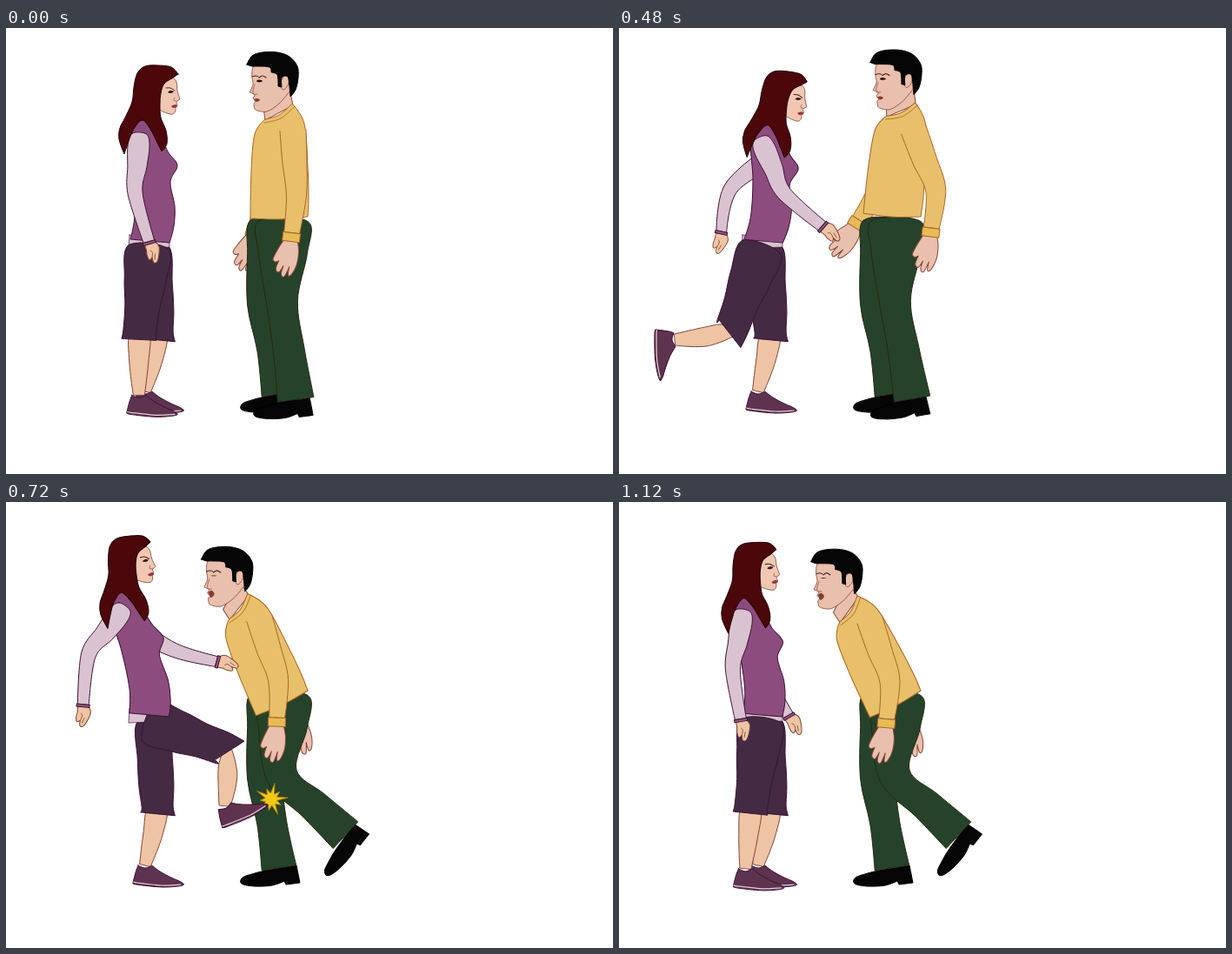
An HTML page that plays this animation: 698 by 513 pixels, repeating every 1.2 s.

```html
<!DOCTYPE html>
<html lang="en">
<head>
<meta charset="utf-8">
<title>Kick</title>
<style>
html, body { margin: 0; width: 100%; height: 100%; overflow: hidden; background: #fff; }
svg { display: block; width: 698px; height: 513px; }
path { stroke-linejoin: round; stroke-linecap: round; }
</style>
</head>
<body>
<svg id="stage" viewBox="0 0 698 513"></svg>
<script>
const stage = document.getElementById("stage");
const LOOP = 1200, STEP = 40;
const TIMES = [120, 240, 480, 640, 720, 960, 1120];
const RAD = Math.PI / 180;
const updates = [];

// Named joint angles (degrees, 0 = right, 90 = down) and offsets, one pose per row.
function poses(names, rows) {
  const keys = names.split(" ");
  return (k, u) => {
    const a = rows[Math.min(k, rows.length - 1)], b = rows[Math.min(k + 1, rows.length - 1)];
    return Object.fromEntries(keys.map((name, i) => [name, a[i] + (b[i] - a[i]) * u]));
  };
}

const womanPose = poses("lean rise upper fore farUpper farFore thigh shin foot", [
  [0, 0, 94, 74, 85, 80, 96, 90, 0],
  [10, 4, 72, 52, 133, 96, 107, 153, 60],
  [15, 6, 66, 41, 141, 102, 110, 174, 83],
  [-11, 0, 104, 81, 57, 56, 52, 130, 8],
  [-26, -3, 127, 96, 29, 15, 20, 95, -28],
  [-18, 2, 109, 86, 54, 48, 86, 97, 0],
  [-14, 4, 100, 81, 72, 60, 97, 95, 0]
]);

const manPose = poses("x y bend upper fore farUpper farFore shin hurt", [
  [0, 0, 0, 87, 97, 100, 106, 82, 0],
  [0, 0, 0.5, 84, 98, 100, 106, 82, 0],
  [0, 0, 5, 70, 97, 108, 122, 80, 0],
  [-4, 6, -7, 73, 96, 90, 88, 67, 0],
  [0, 0, -24, 73, 92, 54, 70, 43, 1],
  [0, 0, -26, 72, 95, 54, 70, 43, 1]
]);

function add(parent, tag, attrs = {}) {
  const el = document.createElementNS("http://www.w3.org/2000/svg", tag);
  for (const name in attrs) el.setAttribute(name, attrs[name]);
  return parent.appendChild(el);
}

// Smooth curve through [x, y, sharp] points.
function curve(pts, closed = true) {
  const n = pts.length;
  const at = i => pts[closed ? (i + n) % n : Math.max(0, Math.min(n - 1, i))];
  const handle = (i, sign) => {
    const [x, y, sharp] = at(i), a = at(i - 1), b = at(i + 1), f = sharp ? 0 : sign / 6;
    return [x + f * (b[0] - a[0]), y + f * (b[1] - a[1])].map(v => v.toFixed(2)).join(" ");
  };
  let d = `M${pts[0][0]} ${pts[0][1]}`;
  for (let i = 0; i < (closed ? n : n - 1); i++) {
    d += `C${handle(i, 1)} ${handle(i + 1, -1)} ${at(i + 1)[0]} ${at(i + 1)[1]}`;
  }
  return closed ? d + "Z" : d;
}

// "x,y" points; "!" marks a sharp turn.
const points = text => text.split(" ").map(p => [...p.match(/-?[\d.]+/g).map(Number), p.endsWith("!")]);

const shape = (parent, fill, stroke, text, width = 1) =>
  add(parent, "path", { d: curve(points(text)), fill, stroke, "stroke-width": width });

const line = (parent, stroke, text, width = 0.8) =>
  add(parent, "path", { d: curve(points(text), false), fill: "none", stroke, "stroke-width": width });

function moving(parent, transform) {
  const g = add(parent, "g");
  updates.push((w, m) => g.setAttribute("transform", transform(w, m)));
  return g;
}

// Chain of bones [angle, length] from a start point.
function chain([x, y], bones) {
  const joints = [{ x, y, a: bones[0][0] }];
  bones.forEach(([angle, length], i) => {
    x += length * Math.cos(angle * RAD);
    y += length * Math.sin(angle * RAD);
    joints.push({ x, y, a: i + 1 < bones.length ? (angle + bones[i + 1][0]) / 2 : angle });
  });
  return { joints, bones };
}

// Outline around a chain; widths are [place, half width], place 1 being the first joint.
function tube({ joints, bones }, widths, closed) {
  const sides = [1, -1].map(side => widths.map(([s, w], i) => {
    const b = Math.max(0, Math.min(bones.length - 1, Math.floor(s)));
    const from = joints[b], [angle, length] = bones[b], d = (s - b) * length;
    const n = (s === b ? from.a : angle) * RAD, a = angle * RAD;
    return [from.x + d * Math.cos(a) - side * w * Math.sin(n),
      from.y + d * Math.sin(a) + side * w * Math.cos(n), i === widths.length - 1];
  }));
  return curve([...sides[0], ...sides[1].reverse()], closed);
}

function limb(parent, fill, stroke, widths, bonesOf, closed = true) {
  const el = add(parent, "path", { fill, stroke });
  updates.push((w, m) => el.setAttribute("d", tube(bonesOf(w, m), widths, closed)));
}

function arm(parent, o, bonesOf) {
  const end = (w, m) => {
    const { joints, bones } = bonesOf(w, m), { x, y } = joints[2];
    return { x, y, a: bones[1][0] };
  };
  const hand = moving(parent, (w, m) => {
    const { x, y, a } = end(w, m);
    return `translate(${x} ${y}) rotate(${a}) translate(${o.cuffLength - 1} 0) rotate(${o.wrist})`;
  });
  o.hand(hand);
  limb(parent, o.fill, o.stroke, o.widths, bonesOf, o.closed);
  const cuff = moving(parent, (w, m) => {
    const { x, y, a } = end(w, m);
    return `translate(${x} ${y}) rotate(${a})`;
  });
  const half = o.widths[o.widths.length - 1][1] + 1;
  add(cuff, "rect", { y: -half, width: o.cuffLength, height: 2 * half, fill: o.cuff, stroke: o.stroke });
}

// A limb looks shorter as it swings away from the vertical.
const reach = (side, extra, angle) => side + extra * Math.sin(angle * RAD);

const man = add(stage, "g"), spark = add(stage, "g"), woman = add(stage, "g");

// Man
const TROUSERS = "#25432a", SEAM = "#2b2612", KNIT = "#e8c06a", RIB = "#a8642a";
const TAN = "#e9bfad", TAN_LINE = "#864436";
const WAIST = [347, 217];

function bendPoint(m, x, y) {
  const c = Math.cos(m.bend * RAD), s = Math.sin(m.bend * RAD), dx = x - WAIST[0], dy = y - WAIST[1];
  return [WAIST[0] + m.x + dx * c - dy * s, WAIST[1] + m.y + dx * s + dy * c];
}

const manArm = {
  fill: KNIT, stroke: RIB, cuff: "#e8bb55", cuffLength: 10, wrist: 2, closed: false,
  widths: [[0, 15], [0.5, 14], [1, 11.5], [2, 9]],
  hand: g => {
    shape(g, TAN, TAN_LINE, "0,-8! 12,-11 26,-11 38,-7 40,-3 30,-3! 42,1 40,5 30,4! 38,8 35,12 25,10! 27,14 24,17 14,14 0,8!");
  }
};

const manShoe = g =>
  shape(g, "#050505", "#000", "-20,4! 16,-2! 20,18! 4,20! 2,16! -12,21 -32,22 -47,19 -46,12 -32,7");

arm(man, manArm, (w, m) => chain(bendPoint(m, 310, 125), [[m.farUpper, 70], [m.farFore, 38]]));

manShoe(add(man, "g", { transform: "translate(318 420)" }));
limb(man, TROUSERS, SEAM, [[0, 20], [0.4, 22], [1, 20], [1.5, 17], [2, 20]],
  () => chain([301, 222], [[92, 96], [81, 104]]));

const backLeg = (w, m) => chain([319, 222], [[91, 93], [m.shin, reach(70, 44, m.shin)]]);
manShoe(moving(man, (w, m) => {
  const { x, y } = backLeg(w, m).joints[2];
  return `translate(${x} ${y}) rotate(${(m.shin - 82) * 1.15})`;
}));
limb(man, TROUSERS, SEAM, [[0, 28], [0.4, 28], [1, 18], [1.5, 18], [2, 21]], backLeg);

const torso = moving(man, (w, m) => `translate(${m.x} ${m.y}) rotate(${m.bend} ${WAIST})`);
shape(torso, TAN, TAN_LINE, "296,92! 298,106! 330,89! 326,70!");
shape(torso, KNIT, RIB, "298,105! 314,100 329,87! 343,110 347,160 348,195 347,217! 315,220 281,219! 282,165 286,122");
line(torso, RIB, "297,109 316,104 332,90");

arm(man, manArm, (w, m) => chain(bendPoint(m, 330, 118), [[m.upper, 75], [m.fore, 43]]));

const manHead = moving(man, (w, m) => {
  const [x, y] = bendPoint(m, 314, 96);
  return `translate(${x - 314 + m.bend / 4} ${y - 97})`;
});
shape(manHead, TAN, TAN_LINE, "285,43! 310,45! 325,58 326,74! 314,88 300,97 289,96! 286,94 285,88 287,85 284,82 286,78 280,75! 284,66 283,58 283,50", 0.8);
shape(manHead, TAN, TAN_LINE, "317,60 321,56 325,59 324,67 319,72 316,68", 0.8);
shape(manHead, "#050505", "#000", "277,43! 283,33 295,29 312,29 326,34 335,45 336,58 333,72 327,80! 326,68 324,57 317,58 317,69! 313,68! 312,55 305,52! 303,46 290,45 283,45");
line(manHead, "#3a1a12", "283,57 287,56 290,57", 1);
line(manHead, "#3a1a12", "291,58 295,56 299,58", 1.2);
line(manHead, TAN_LINE, "286,66 284,73 285,77 289,77", 0.7);
const manEye = moving(manHead, (w, m) => `translate(291 62) scale(1 ${1 - 0.75 * m.hurt})`);
shape(manEye, "#2a0c0a", "none", "-3,0 0,-1.5 4,0 0,1.5");
const manMouth = moving(manHead, (w, m) => `translate(288 ${84 - m.hurt}) scale(1 ${1 + m.hurt})`);
shape(manMouth, "#8a3a2c", "none", "-3,-1! 1,-2 4,0 0,2");

// Impact star
const rays = Array.from({ length: 20 }, (_, i) => {
  const r = i % 2 ? 7 : i % 4 ? 13 : 19, a = i * Math.PI / 10 + 0.1;
  return [305 + r * Math.cos(a), 342 - r * Math.sin(a)];
});
add(spark, "path", { d: "M" + rays.join("L") + "Z", fill: "#f4c916", stroke: "#b07a08", "stroke-width": 0.8 });

// Woman
const VEST = "#8d4c7e", SLEEVE = "#dac3d1", SHORTS = "#442a43", SHOE = "#5e3350";
const SKIN = "#efc4a4", PLUM = "#3c1233", SKIN_LINE = "#7a4438";
const HIPS = 250, HEIGHT = 150;

// The body slants with the lean, rooted at the hips.
const slantPoint = (w, x, y) => {
  const h = (HIPS - y) / HEIGHT;
  return [x + w.lean * h, y + w.rise * h];
};

const womanArm = {
  fill: SLEEVE, stroke: PLUM, cuff: "#94587f", cuffLength: 3, wrist: -12, closed: true,
  widths: [[-0.12, 8], [0.1, 12.5], [0.5, 11], [1, 8.5], [2, 6.5]],
  hand: g => {
    shape(g, SKIN, SKIN_LINE, "0,-6! 8,-8 16,-4 23,2 22,6 16,5! 17,9 11,9 6,7 0,6!");
    line(g, SKIN_LINE, "16,5 11,2 8,3");
    line(g, SKIN_LINE, "19,3 14,0");
  }
};

const SHIN = [[0.93, 11], [1.4, 11], [2, 6.5]];

const womanShoe = g => {
  shape(g, SHOE, PLUM, "-8,0! 0,3 8,0! 17,7 30,14 41,19 43,23 20,25 -10,22 -14,20! -11,8");
  line(g, "#e6cbd8", "-13,19 -9,20 20,23 41,22", 1.2);
};

arm(woman, { ...womanArm, widths: [[0, 10], [1, 8], [2, 6]] },
  w => chain(slantPoint(w, 162, 145), [[w.farUpper, 57], [w.farFore, 50]]));

const standingLeg = () => chain([169, 252], [[87, 107], [104, 61]]);
limb(woman, SKIN, SKIN_LINE, SHIN, standingLeg);
womanShoe(add(woman, "g", { transform: "translate(160 418)" }));
limb(woman, SHORTS, PLUM, [[0, 18], [0.4, 20], [0.7, 20], [0.92, 18], [1, 20]], standingLeg);

shape(woman, SLEEVE, PLUM, "142,238! 188,242! 188,252! 141,254!", 0.7);

const kickLeg = w => chain([164, 252], [[w.thigh, reach(95, 12, w.thigh)], [w.shin, 64]]);
limb(woman, SKIN, SKIN_LINE, SHIN, kickLeg);
womanShoe(moving(woman, w => {
  const { x, y } = kickLeg(w).joints[2];
  return `translate(${x} ${y}) rotate(${w.foot})`;
}));
limb(woman, SHORTS, PLUM, [[0, 23], [0.35, 24], [0.65, 20], [0.92, 19], [1, 20]], kickLeg);

const body = moving(woman, ({ lean, rise }) => {
  const k = lean / HEIGHT, r = rise / HEIGHT;
  return `matrix(1 0 ${-k} ${1 - r} ${k * HIPS} ${r * HIPS})`;
});
shape(body, VEST, PLUM, "139,120 157,106 175,118 186,142 197,158 189,177 194,205 193,228 188,247! 143,243! 148,215 146,170");

arm(woman, womanArm, w => chain(slantPoint(w, 153, 129), [[w.upper, 62], [w.fore, 57]]));

const womanHead = moving(woman, w => `translate(${w.lean} ${w.rise}) rotate(${w.lean * 0.3} 165 95)`);
shape(womanHead, "#f0c8b2", SKIN_LINE, "176,62! 191,56! 196,62 197,72 200,82! 196,85 197,89 195,92 195,95 192,99 185,98 176,94!", 0.8);
shape(womanHead, "#4b0709", "#230305", "198,53! 190,45 175,43 160,44 151,52 147,68 145,85 137,103 131,115 130,128 136,145! 141,130 147,116 157,106 167,118 173,130 179,142! 185,133 184,118 178,103 177,88 178,75 182,64 191,58!");
line(womanHead, "#4a1c18", "184,69 189,69 194,72", 1);
shape(womanHead, "#3a1a20", "none", "186,74 189,72 193,73 190,75");
line(womanHead, SKIN_LINE, "196,84 193,83 194,80", 0.7);
shape(womanHead, "#9c3540", "none", "190,90 195,88 197,90 193,92");

function draw(now) {
  const t = Math.floor((now % LOOP) / STEP) * STEP;
  let k = 0;
  while (k < 6 && t >= TIMES[k + 1]) k++;
  const u = k === 6 ? 0 : Math.max(0, (t - TIMES[k]) / (TIMES[k + 1] - TIMES[k]));
  const w = womanPose(k, u), m = manPose(k, u);
  updates.forEach(update => update(w, m));
  spark.style.display = t >= 720 && t < 800 ? "" : "none";
  requestAnimationFrame(draw);
}
draw(performance.now());
</script>
</body>
</html>
```
